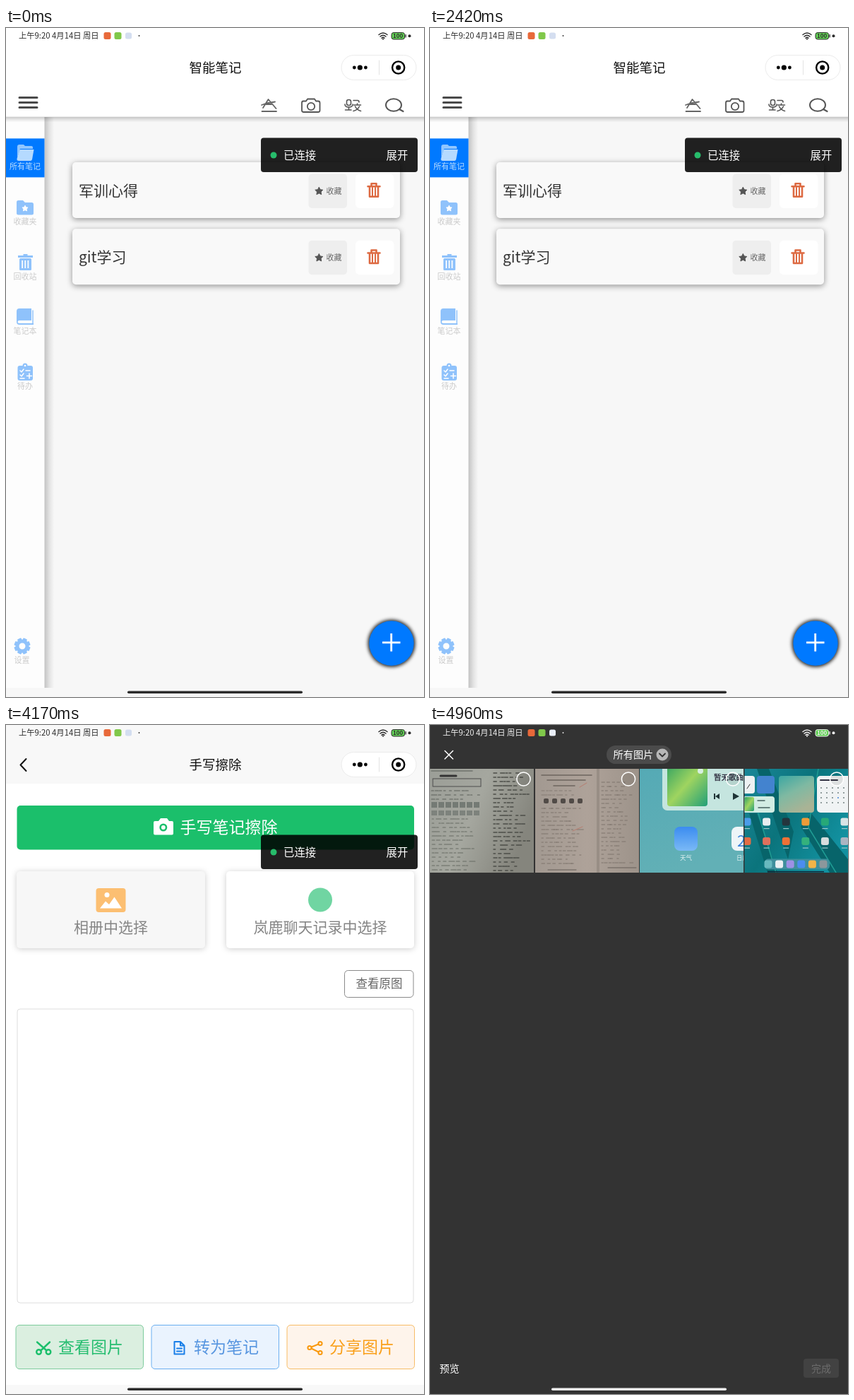
Animation of 592x947 px, one loop 5000 ms. Source, as an HTML page:

```html
<!DOCTYPE html>
<html lang="zh-CN">
<head>
<meta charset="utf-8">
<title>智能笔记</title>
<style>
  html, body { margin: 0; width: 100%; height: 100%; overflow: hidden; background: #fff; }
  svg { display: block; width: 592px; height: 947px; }
  text { font-family: "Noto Sans CJK SC", "Noto Sans CJK", "Noto Sans", sans-serif; }
  .line { fill: none; stroke-linecap: round; stroke-linejoin: round; }
  .soft { filter: drop-shadow(0 1px 4px rgba(0,0,0,.2)); }
  .deep { filter: drop-shadow(0 2px 4px rgba(0,0,0,.42)); }
  .blur { filter: blur(2.5px); }
</style>
</head>
<body>
<svg id="stage" viewBox="0 0 592 947" xmlns="http://www.w3.org/2000/svg"></svg>
<script>
const LOOP = 5000;
const BLUE = '#0079ff', PALE = '#8fc2fb', GREEN = '#1bbf6b';

const rect = (x, y, w, h, fill, rx = 0, extra = '') =>
  `<rect x="${x}" y="${y}" width="${w}" height="${h}" rx="${rx}" fill="${fill}" ${extra}/>`;
const circle = (x, y, r, fill, extra = '') =>
  `<circle cx="${x}" cy="${y}" r="${r}" fill="${fill}" ${extra}/>`;
const text = (x, y, size, fill, str, anchor = 'start', extra = '') =>
  `<text x="${x}" y="${y}" font-size="${size}" fill="${fill}" text-anchor="${anchor}" ${extra}>${str}</text>`;
const line = (d, color, width = 2) =>
  `<path class="line" d="${d}" stroke="${color}" stroke-width="${width}"/>`;
const shape = (d, fill) => `<path d="${d}" fill="${fill}"/>`;
const at = (x, y, body) => `<g transform="translate(${x} ${y})">${body}</g>`;
const gradient = (id, vec, ...stops) => `<linearGradient id="${id}" ${vec}>` +
  stops.map((c, i) => `<stop offset="${i / (stops.length - 1)}" stop-color="${c}"/>`).join('') +
  '</linearGradient>';

function star(x, y, r, fill) {
  const pts = Array.from({ length: 10 }, (_, i) => {
    const a = i * Math.PI / 5, k = i % 2 ? r * 0.5 : r;
    return (x + k * Math.sin(a)).toFixed(2) + ',' + (y - k * Math.cos(a)).toFixed(2);
  });
  return `<polygon points="${pts.join(' ')}" fill="${fill}" stroke="${fill}" stroke-linejoin="round"/>`;
}

function seeded(seed) {
  return () => (seed = (seed * 16807) % 2147483647) / 2147483647;
}

const shade = ['rgba(0,0,0,.22)', 'rgba(0,0,0,.09)', 'rgba(0,0,0,0)'];
const defs = `<defs>
  ${gradient('sideShade', '', ...shade)}
  ${gradient('topShade', 'x2="0" y2="1"', ...shade)}
  ${gradient('paperA', 'x2="1" y2=".4"', '#9b9e97', '#a5a79f', '#85857d')}
  ${gradient('paperB', '', '#a29991', '#aea299', '#9d938a')}
  ${gradient('sky', 'x2=".3" y2="1"', '#55aab5', '#62b0b6')}
  ${gradient('leaf', 'x2="1" y2="1"', '#2a9f62', '#9fd460', '#219f78')}
  ${gradient('desk', 'x2="1" y2=".6"', '#1a8798', '#0b747c', '#1291a0')}
  ${gradient('beach', 'x2=".5" y2="1"', '#3ca7a2', '#7fb9a2', '#a9b395')}
  ${gradient('tile', 'x2="0" y2="1"', '#3b8cf0', '#7ab9f6')}
  ${[0, 149, 297, 445.5].map((x, i) =>
    `<clipPath id="c${i}">${rect(x, 62, 147, 147, '#000')}</clipPath>`).join('')}
</defs>`;

function bin(color, hole) {
  return rect(-2.5, -11, 6, 2.2, color) + rect(-10, -9, 21, 3, color) +
    rect(-8, -5, 17, 17, color, 1.5) +
    [-4.7, -.6, 3.5].map(x => rect(x, -2, 1.7, 11, hole)).join('');
}

function outlineBin(x, y) {
  const c = '#dd6a42';
  return at(x, y, line('M-8.5 -5.5H8.5M-3.5 -6V-9.5H3.5V-6M-6 -5V9H6V-5', c, 2.6) +
    line('M-2 -4V8M2 -4V8', c, 2));
}

function toolbar() {
  const c = '#555';
  return line('M19 98.5H44M19 105.5H44M19 112.5H44', '#4a4a4a', 3) +
    line('M362.5 118H383M364 113L371.5 101L382.5 114M362 109L369 106.5L381 104.5M367 108H376', '#666', 1.8) +
    line('M420.5 103.5H425L427 100.5H437L439 103.5H442Q444.5 103.5 444.5 106V116.5Q444.5 119 442 119H421.5Q419 119 419 116.5V106Q419 103.5 421 103.5Z', c, 1.8) +
    circle(432, 111, 5.2, 'none', `stroke="${c}" stroke-width="1.8"`) +
    line('M482.5 104Q482.5 101.5 485.5 101.5T488.5 104V107Q488.5 109.5 485.5 109.5T482.5 107ZM480 108Q480 112 485.5 112T491 108M480.5 116H489M485.5 112V116M492 102.5H498Q500 102.5 500 105', c, 1.6) +
    line('M492.5 109H502.5M497.5 107V109M500.5 111Q498 116 492 117.5M494.5 111Q497 116 502.5 117.5', c, 1.6) +
    `<ellipse cx="549" cy="109" rx="11" ry="8.8" fill="none" stroke="${c}" stroke-width="2"/>` +
    line('M557 115L562.5 118', c, 2.2);
}

function gear(x, y) {
  const teeth = Array.from({ length: 8 }, (_, i) =>
    `<g transform="rotate(${i * 45 + 22.5})">${rect(-3, -11.5, 6, 6, PALE, 1)}</g>`).join('');
  return at(x, y, teeth + circle(0, 0, 7, 'none', `stroke="${PALE}" stroke-width="5"`));
}

function sidebar() {
  const label = (s, y, x = 27) => text(x, y, 11, '#cbcbcb', s, 'middle');
  return rect(54, 126, 14, 808, 'url(#sideShade)') + rect(0, 126, 54.5, 808, '#fdfdfd') +
    rect(0, 156.4, 54.5, 55, BLUE) +
    shape('M16 168Q16 165 19 165H25L27 167H36Q38 167 38 169V171H20L16 184Z', '#8fc6ff') +
    shape('M19.5 172H39.5L37 186Q36.5 188 34.5 188H18Q15 188 15.5 185Z', '#b5daff') +
    text(27, 200, 11, '#b8dbff', '所有笔记', 'middle') +
    shape('M15 246.5Q15 244 17.5 244H24L27 247H36.5Q39 247 39 249.5V262Q39 264.5 36.5 264.5H17.5Q15 264.5 15 262Z', PALE) +
    star(27, 255.5, 4.3, '#fff') + label('收藏夹', 277.5) +
    at(27, 331, bin(PALE, '#fff')) + label('回收站', 355.5) +
    shape('M15 401Q15 397 19 397H36V414H19Q16.5 414 16.5 416T19 418H39V420H19Q15 420 15 416Z', PALE) +
    line('M38 400V418', PALE, 1.5) + label('笔记本', 433) +
    rect(16.5, 478, 21.5, 21, PALE, 3) + circle(27, 478, 3.5, PALE) + circle(27, 478, 1.3, '#fff') +
    line('M20 485L22 487L25 483M20 491L22 493L25 489', '#fff', 1.5) +
    line('M28 485H34M33 489V496M29.5 492.5H36.5M20 496H26', '#fff', 1.5) + label('待办', 510.5) +
    gear(23, 875) + label('设置', 899, 22.5);
}

function note(title, y) {
  return rect(94, y, 464, 79, '#f9f9f9', 5, 'class="deep"') +
    text(103, y + 48, 21, '#333', title) +
    rect(428.5, y + 16.5, 54.5, 48.5, '#eee', 5) + star(443.3, y + 41, 5.8, '#555') +
    text(453.5, y + 45, 11, '#666', '收藏') +
    rect(495, y + 16.5, 54.5, 48.5, '#fff', 6) + outlineBin(521, y + 39.7);
}

function home() {
  return rect(0, 0, 592, 947, '#f7f7f7') + sidebar() +
    rect(0, 125.5, 592, 8, 'url(#topShade)') + rect(0, 0, 592, 125.5, '#fff') +
    text(296.5, 63, 18.5, '#111', '智能笔记', 'middle') + toolbar() +
    note('军训心得', 190) + note('git学习', 284.3) +
    circle(546, 871, 33.5, '#222', 'class="blur"') + circle(546, 871, 31.7, BLUE) +
    rect(533, 868.5, 25.5, 2.8, '#fff') + rect(544.3, 857, 2.8, 25.5, '#fff');
}

function action(x, fill, edge, color, label, icon) {
  return rect(x, 849.5, 180.5, 62, fill, 5, `stroke="${edge}"`) +
    text(x + 60, 888.5, 23, color, label) + at(x + 39, 881.5, icon);
}

function erase() {
  const ring = x => circle(x, 6, 3.3, 'none', `stroke="${GREEN}" stroke-width="2.4"`);
  const scissors = ring(-6.5) + ring(7) +
    line('M-9 -8L4.5 4M9 -8L1.5 -1M-4 4L-1 1.5', GREEN, 2.4);
  const page = line('M-6.5 -8.5H2L7.5 -3V9H-6.5ZM2 -8V-3H7M-3 1H4M-3 5H4', '#1a7fe8', 2);
  const share = [[-7, 0], [8, -6], [8, 7]].map(([x, y]) =>
    circle(x, y, 2.6, 'none', 'stroke="#f9990f" stroke-width="2"')).join('') +
    line('M-4.5 -1L5.5 -5M-4.5 1L5.5 6', '#f9990f', 2);
  return rect(0, 0, 592, 947, '#f8f8f8') + rect(0, 83, 592, 851, '#fff') +
    line('M28.5 48L20.5 56.5L28.5 65', '#111', 2) +
    text(296.5, 63, 18.5, '#111', '手写擦除', 'middle') +
    rect(15.5, 114, 562.5, 62.5, GREEN, 5) +
    shape('M211 136H216L219 132H228L231 136H235Q237 136 237 138V153.5Q237 155.5 235 155.5H211Q209 155.5 209 153.5V138Q209 136 211 136Z', '#fff') +
    circle(222.8, 145, 4.2, '#fff', `stroke="${GREEN}" stroke-width="2.6"`) +
    text(246.5, 153, 23, '#fff', '手写笔记擦除') +
    rect(15, 207, 267, 109, '#fff', 5, 'class="soft" id="album"') +
    rect(312, 207, 266, 109, '#fff', 5, 'class="soft"') +
    rect(127.5, 231, 42, 34, '#fcbf72', 4) + circle(143, 240.5, 3.5, '#fff') +
    shape('M133 259.5L141 249.5L146 254L153.5 243.5L164 259.5Z', '#fff') +
    text(148.5, 294, 21, '#858585', '相册中选择', 'middle') +
    circle(445, 247.5, 17, '#70d5a2') +
    text(445, 294, 21, '#858585', '岚鹿聊天记录中选择', 'middle') +
    rect(479.5, 347.5, 97.5, 38, '#fff', 5, 'stroke="#8a8a8a"') +
    text(528.5, 372, 16.5, '#666', '查看原图', 'middle') +
    rect(16, 402, 561, 416, '#fff', 4, 'stroke="#dedede"') +
    action(14, '#dbefe0', '#7ccb9c', '#26bd70', '查看图片', scissors) +
    action(206, '#eaf3fe', '#69aef0', '#5896e0', '转为笔记', page) +
    action(398, '#fef4eb', '#f7bc65', '#f9a01b', '分享图片', share);
}

// Rows of short strokes that read as printed writing.
function writing(seed, x, y, w, bottom, color, weight) {
  const rnd = seeded(seed);
  let d = '';
  for (; y < bottom; y += 6) {
    for (let px = x; px < x + w * (.5 + rnd() * .5); px += 3 + rnd() * 7) {
      d += `M${px.toFixed(1)} ${y}h${(2 + rnd() * 3).toFixed(1)}`;
    }
  }
  return line(d, color, weight);
}

const thumbs = [
  () => rect(0, 62, 148, 147, 'url(#paperA)') + line('M2 65H60', '#70746d', 1.5) +
    line('M15 72H37', '#333', 3) + rect(4, 76, 68, 11, 'none', 0, 'stroke="#4c4c4c"') +
    [0, 1, 2, 3, 4, 5, 6].map(i => rect(2 + i * 10, 109, 8, 8, '#747a74') +
      rect(2 + i * 10, 121, 8, 7, '#7d827c')).join('') +
    writing(11, 2, 93, 74, 108, '#5c605a', 1.2) + writing(23, 3, 133, 68, 208, '#686c64', 1.2) +
    writing(37, 90, 68, 54, 208, '#4c4e48', 1.5),
  () => rect(149, 62, 147, 147, 'url(#paperB)') + rect(236, 62, 4, 147, '#887e76', 0, 'opacity=".5"') +
    line('M158 71H229M166 78H220M175 86H205', '#6d655f', 1.6) +
    [0, 1, 2, 3, 4].map(i => rect(161 + i * 12, 104, 7, 7, '#514b47', 2)).join('') +
    writing(51, 158, 93, 70, 101, '#847a72', 1) + writing(53, 158, 118, 66, 200, '#7e756d', 1) +
    writing(67, 243, 81, 46, 196, '#7e756d', 1) +
    line('M202 150L216 144M212 88L222 82', '#b77d70', 1) +
    line('M167 205H207M252 202H292', '#665e58', 1),
  () => rect(297, 62, 148, 147, 'url(#sky)') + rect(329, 50, 125, 71, '#c5e5df', 7) +
    rect(336, 50, 57, 65, 'url(#leaf)', 4) + circle(383, 65, 4, '#d7efe0') +
    text(402, 78, 10.5, '#334', '暂无歌曲', 'start', 'font-weight="700"') +
    shape('M402 97H404V105H402ZM410 97V105L404 101ZM429 96L438 101L429 106Z', '#1f3436') +
    rect(346, 144, 33, 34, 'url(#tile)', 8) +
    text(362.5, 191, 8.5, '#e8f6f6', '天气', 'middle') +
    rect(427, 144, 33, 34, '#eef5f8', 8) + text(435, 172, 22, '#3c83dc', '2') +
    text(434, 191, 8.5, '#e8f6f6', '日历'),
  () => {
    const tones = ['#4c9ce9', '#e8eef0', '#24353d', '#ee9b38', '#27a878', '#d8e4e6'];
    const tones2 = ['#e36c45', '#df705c', '#ef7136', '#34b17c', '#d7dddd', '#aab5c2'];
    const icons = (list, y) => list.map((c, i) => rect(443.5 + i * 27.6, y - 5.5, 11, 11, c, 3) +
      rect(445 + i * 27.6, y + 9, 8, 1.2, '#9fc8cb')).join('');
    const days = Array.from({ length: 20 }, (_, i) =>
      circle(554 + i % 5 * 8, 89 + (i / 5 | 0) * 7, .9, i === 13 ? '#2d78d8' : '#677')).join('');
    return rect(445, 62, 147, 147, 'url(#desk)') +
      shape('M463 125L492 209H478L452 125ZM463 62H480L515 151L507 190ZM540 125L592 190V209H566L525 144Z', '#07646a') +
      line('M465 125L490 209M550 62L536 145L575 209', '#1f9c94', 1.5) +
      rect(440, 72, 20, 25, '#eef1f2', 4) + line('M449 90L453 84', '#333', 1) +
      rect(463, 72, 25, 25, '#4383cf', 4) + rect(494, 72, 50, 52, 'url(#beach)', 4) +
      rect(548, 72, 50, 52, '#f0f3f4', 5) + line('M553 78H577', '#334', 2) + days +
      rect(440, 101, 48, 23, '#d2ece3', 4) + rect(445, 102, 14, 20, 'url(#leaf)', 2) +
      line('M464 107H474M465 117H481', '#44605d', 1.4) +
      icons(tones, 137) + icons(tones2, 164.5) + rect(474, 189.5, 92, 15, '#3f8f9c', 5) +
      ['#68b9bf', '#eaf0f3', '#9d91e5', '#4b8df0', '#f2b447', '#8c979c'].map((c, i) =>
        rect(473.5 + i * 15.6, 191.5, 11, 11, c, 3)).join('') +
      rect(478, 207, 80, 1.4, '#123');
  }
];

function gallery() {
  const photos = thumbs.map((draw, i) => `<g clip-path="url(#c${i})">${draw()}</g>`).join('');
  const picks = [132.5, 281, 429, 576].map(x =>
    circle(x, 76.5, 9.6, 'rgba(0,0,0,.08)', 'stroke="#fff" stroke-width="1.5"')).join('');
  return rect(0, 0, 592, 947, '#333') +
    line('M21 36.5L32.5 48M32.5 36.5L21 48', '#fff', 1.5) +
    rect(250, 29, 92, 26, '#4b4b4b', 13) + text(259.5, 47, 14.2, '#fff', '所有图片') +
    circle(329, 42, 8.5, '#b7b7b7') + line('M325 40.5L329 44.5L333 40.5', '#333', 1.8) +
    photos + picks + text(13.5, 915.5, 14, '#fff', '预览') +
    rect(529, 897, 50, 27, '#424242', 4) + text(554, 915.5, 14, '#6c6c6c', '完成', 'middle');
}

function overlay() {
  return rect(475, 38.5, 106, 35, '#fff', 17.5, 'stroke="#ebebeb"') +
    circle(493.3, 56, 2.4, '#000') + circle(501.3, 56, 3.6, '#000') + circle(509.4, 56, 2.4, '#000') +
    line('M528.5 46V66', '#e3e3e3', 1) +
    circle(555.7, 56, 8.6, 'none', 'stroke="#000" stroke-width="2.4"') + circle(555.7, 56, 3.5, '#000') +
    rect(361, 155.5, 222, 48.5, 'rgba(0,0,0,.87)', 4) + circle(379, 180, 4.5, '#27bc6b') +
    text(393, 185.5, 15.4, '#fff', '已连接') + text(538.5, 185.5, 15.4, '#fff', '展开');
}

function systemBar(ink, third) {
  return text(18, 15, 11.3, ink, '上午9:20 4月14日 周日', 'start', 'font-weight="500"') +
    rect(138.5, 6, 10, 10, '#e8693a', 2.5) + rect(153.5, 6, 10, 10, '#80c84a', 2.5) +
    rect(169, 6.5, 9, 9, third, 2.5) + circle(188.5, 11, .9, ink) +
    line('M528 9.5Q534 4.5 540 9.5M530 12Q534 8.5 538 12M532 14.3Q534 12.5 536 14.3', ink, 1.5) +
    circle(534, 15.8, 1, ink) +
    rect(546, 6.5, 18.5, 9.5, '#62cf55', 3, `stroke="${ink}"`) + rect(565.5, 9, 1.3, 4.5, ink, .6) +
    text(555.2, 14.3, 8, ink, '100', 'middle', 'font-weight="700"') +
    circle(571.5, 11.3, 2, ink) + rect(172, 938.5, 248, 3.5, ink, 1.75);
}

document.getElementById('stage').innerHTML = defs + home() +
  `<g id="erase">${erase()}</g>${overlay()}<g id="gallery">${gallery()}</g>` +
  `<g id="dark">${systemBar('#2c2c2c', '#d4def0')}</g>` +
  `<g id="light">${systemBar('#f0f0f0', '#e9eef8')}</g>`;

const part = id => document.getElementById(id);
const [erasePage, galleryPage, album, dark, light] =
  ['erase', 'gallery', 'album', 'dark', 'light'].map(part);
const show = (el, on) => { el.style.display = on ? '' : 'none'; };
const glide = (t, from, to) => {
  const p = Math.min(1, Math.max(0, (t - from) / (to - from)));
  return 1 - (1 - p) ** 3;
};

const start = performance.now();
function render() {
  const t = Math.max(0, performance.now() - start) % LOOP;
  const slide = glide(t, 2430, 2650), rise = glide(t, 4180, 4360);
  show(erasePage, slide > 0);
  erasePage.setAttribute('transform', `translate(${592 * (1 - slide)} 0)`);
  album.setAttribute('fill', t >= 4080 ? '#f7f7f7' : '#fff');
  show(galleryPage, rise > 0);
  galleryPage.setAttribute('transform', `translate(0 ${947 * (1 - rise)})`);
  show(dark, rise < .5);
  show(light, rise >= .5);
  requestAnimationFrame(render);
}
render();
</script>
</body>
</html>
```
